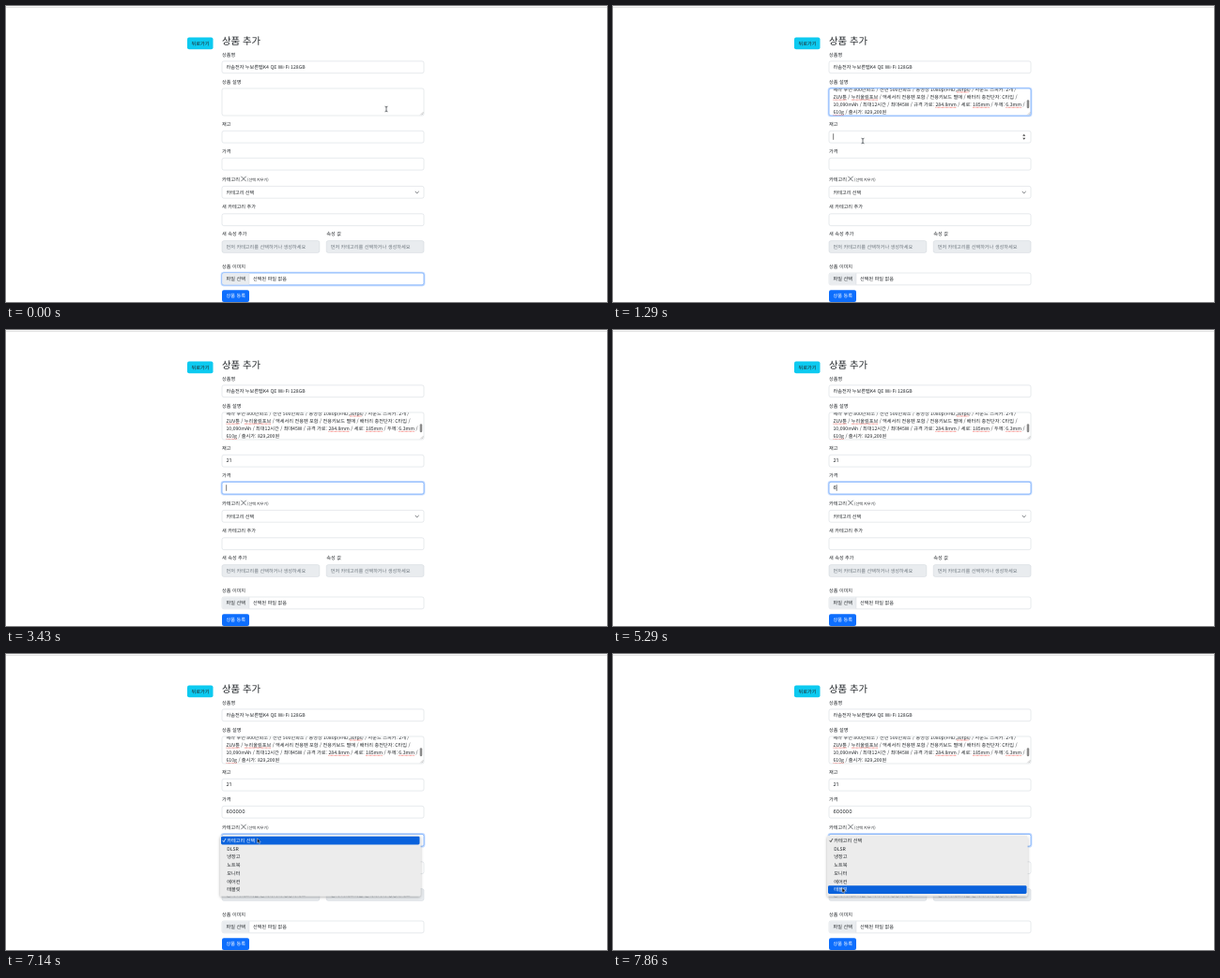
An HTML page for the animation above (8 s loop, 640x316 px).

```html
<!DOCTYPE html>
<html lang="ko">
<head>
<meta charset="utf-8">
<style>
  html, body { margin: 0; width: 100%; height: 100%; overflow: hidden; background: #fff; }
  svg { display: block; width: 100%; height: 100%; }
  text {
    font: 400 5.15px "Noto Sans CJK KR", "Noto Sans CJK", "Noto Sans", sans-serif;
    fill: #212529; text-rendering: geometricPrecision; white-space: pre;
  }
  .label { font-weight: 500; }
  .title { font-size: 10.4px; font-weight: 500; }
  .small { font-size: 4.1px; }
  .muted { fill: #6c757d; }
  .white { fill: #fff; font-weight: 500; }
  .number { font: 400 5.3px Inter, "Noto Sans", sans-serif; }
  .box { stroke: #ced4da; stroke-width: .5; }
  .ring { fill: none; stroke: #0d6efd; stroke-opacity: .25; stroke-width: 1.5; visibility: hidden; }
  .focus .ring { visibility: visible; }
  .focus .box { stroke: #77adfb; stroke-width: .8; }
  .line { fill: none; stroke: #343a40; stroke-width: .7; stroke-linecap: round; stroke-linejoin: round; }
  .typo { stroke: #f0443c; stroke-width: .7; stroke-dasharray: .8 .5; }
</style>
</head>
<body>
<svg id="stage" viewBox="0 0 640 316">
  <defs>
    <clipPath id="areaClip"><rect x="230.3" y="88.3" width="214.4" height="28.4"/></clipPath>
    <filter id="shadow" x="-10%" y="-20%" width="120%" height="150%">
      <feDropShadow dx="0" dy="1.2" stdDeviation="1.8" flood-opacity=".32"/>
    </filter>
  </defs>
</svg>
<script>
const stage = document.getElementById("stage");
const TICK = 1000 / 7, LOOP = 8000;

function add(tag, attrs = {}, parent = stage, content = "") {
  const el = document.createElementNS("http://www.w3.org/2000/svg", tag);
  for (const key in attrs) el.setAttribute(key, attrs[key]);
  el.textContent = content;
  return parent.appendChild(el);
}
// y is the optical middle of the line
function write(content, x, y, cls = "", parent = stage) {
  const drop = cls === "title" ? 4 : cls === "small" ? 1.6 : 2;
  return add("text", { x, y: y + drop, class: cls }, parent, content);
}
function field(y, height = 12.8, x = 230, width = 215, fill = "#fff") {
  const g = add("g");
  add("rect", { class: "ring", x: x - .6, y: y - .6, width: width + 1.2, height: height + 1.2, rx: 2.4 }, g);
  add("rect", { class: "box", x, y, width, height, rx: 2, fill }, g);
  return g;
}
function button(content, x, y, width, fill, cls) {
  add("rect", { x, y, width, height: 12.8, rx: 2, fill });
  write(content, x + 4.5, y + 6.2, cls);
}
function show(el, on) { el.style.visibility = on ? "visible" : "hidden"; }

// Page
add("rect", { y: .8, width: 640, height: 1, fill: "#dcdcdc" });
button("뒤로가기", 193, 33.4, 27.5, "#0dcaf0", "label");
write("상품 추가", 230, 37, "title");
[["상품명", 51.5], ["상품 설명", 80.5], ["재고", 126], ["가격", 155], ["카테고리", 185],
 ["새 카테고리 추가", 214.2], ["새 속성 추가", 243.4], ["상품 이미지", 277.5]]
  .forEach(([name, y]) => write(name, 230, y, "label"));
write("속성 값", 341.3, 243.4, "label");
add("path", { class: "line", d: "M250.6 182.1l4.8 4.8m0-4.8l-4.8 4.8", "stroke-width": .5 });
write("(선택 지우기)", 257, 185.2, "small");

field(58.9);
write("라솜전자 누보른탭K4 QE Wi-Fi 128GB", 234.5, 65);
const area = field(88, 29);
const stock = field(133.3);
const price = field(162.3);
const select = field(192.4);
write("카테고리 선택", 234.5, 198.5);
add("path", { class: "line", d: "M436 198.2l1.7 1.7 1.7-1.7" });
field(221.8);
for (const x of [230, 341.2]) {
  field(250.6, 12.8, x, 103.8, "#e9ecef");
  write("먼저 카테고리를 선택하거나 생성하세요", x + 4.5, 256.6, "muted");
}
const file = field(285);
add("path", { d: "M259 285.3h-27a1.7 1.7 0 0 0-1.7 1.7v8.8a1.7 1.7 0 0 0 1.7 1.7h27z", fill: "#e9ecef" });
add("path", { d: "M259 285.3v12.2", stroke: "#ced4da", "stroke-width": .4 });
write("파일 선택", 234.5, 291);
write("선택된 파일 없음", 263, 291);
button("상품 등록", 230, 303.2, 29, "#0d6efd", "white");

// Description
const pasted = add("g", { "clip-path": "url(#areaClip)" });
const typos = add("g", { "clip-path": "url(#areaClip)" });
const spec = [
  ["메라 후면 800만화소 / 전면 500만화소 / 동영상 1080p(FHD,30fps) / 사운드 스피커: 2개 /", "30fps"],
  ["ZUV튠 / 누리울림포브 / 액세서리 전용펜 포함 / 전용키보드 별매 / 배터리 충전단자: C타입 /", "ZUV튠", "누리울림포브"],
  ["10,090mAh / 최대12시간 / 최대45W / 규격 가로: 284.8mm / 세로: 185mm / 두께: 6.3mm /", "284.8mm", "185mm", "6.3mm"],
  ["610g / 출시가: 829,200원", "610g"]
].map(([content, ...words], i) => {
  const y = 88.7 + i * 8.15, line = write(content, 234.5, y, "", pasted);
  for (const word of words) {
    const at = content.indexOf(word);
    const x1 = line.getStartPositionOfChar(at).x;
    const x2 = line.getEndPositionOfChar(at + word.length - 1).x;
    add("line", { class: "typo", x1, x2, y1: y + 3.3, y2: y + 3.3 }, typos);
  }
  return line;
});
add("rect", { x: 440.7, y: 100.2, width: 2.5, height: 9, rx: 1.2, fill: "#8b8b8b" }, pasted);
add("path", { class: "line", d: "M441.6 116l2.6-2.6m-1.2 2.6l1.2-1.2", style: "stroke:#888;stroke-width:.4" });

// Values and caret
const stockText = write("", 234.5, 139.4, "number");
const priceText = write("", 234.5, 168.4, "number");
const spinner = add("path", { d: "M436.2 138.8l1.5-2 1.5 2zM436.2 140.8l1.5 2 1.5-2z", fill: "#444" });
const caret = add("rect", { width: .6, height: 6.6, fill: "#222" });

// Drop-down list
const ROW = 8.75, LIST_TOP = 194.7;
const list = add("g");
add("rect", { x: 228, y: 193.8, width: 213.5, height: 64.8, rx: 2.2, fill: "#ececec", filter: "url(#shadow)" }, list);
const bar = add("rect", { x: 229, width: 211.5, height: 8.7, rx: 1.4, fill: "#0a62dc" }, list);
const items = ["카테고리 선택", "DLSR", "냉장고", "노트북", "모니터", "에어컨", "태블릿"]
  .map((name, i) => write(name, 235.3, LIST_TOP + 4.2 + i * ROW, "", list));
const check = add("path", { class: "line", d: "M230.8 199.2l1.1 1.5 1.9-3.4" }, list);

// Pointers, drawn around their hot spot
const beam = add("path", { class: "line", d: "M-1.1-2.8Q0-2.8 0-2V2Q0 2.8-1.1 2.8M1.1-2.8Q0-2.8 0-2M0 2Q0 2.8 1.1 2.8" });
const arrow = add("path", { d: "M0 0V5.2L1.2 4.1 2 6 2.9 5.6 2.1 3.8H3.7Z", fill: "#111", stroke: "#fff", "stroke-width": .4 });

// [tick, x, y]
const path = [[0, 405, 110], [4, 405, 110], [9, 266, 144], [44, 266, 144], [45, 256, 168],
  [49, 268, 195.5], [51, 267, 198], [52, 262, 206], [53, 255, 224], [54, 247, 242], [55, 244, 249.5]];
function pointerAt(tick) {
  const next = path.findIndex(p => p[0] >= tick);
  if (next < 1) return path[0].slice(1);
  const a = path[next - 1], b = path[next], k = (tick - a[0]) / (b[0] - a[0]);
  return [a[1] + (b[1] - a[1]) * k, a[2] + (b[2] - a[2]) * k];
}
// Latest value whose tick has passed
const latest = (tick, steps) => steps.reduce((v, [at, value]) => tick >= at ? value : v, steps[0][1]);

function render(ms) {
  const tick = Math.min(55, Math.floor((ms % LOOP + 6) / TICK));

  const focused = latest(tick, [[0, file], [2, area], [10, stock], [24, price], [50, select]]);
  for (const f of [file, area, stock, price, select]) f.setAttribute("class", f === focused ? "focus" : "");

  const hasText = tick >= 4;
  show(pasted, hasText);
  show(typos, tick >= 6);
  stockText.textContent = latest(tick, [[0, ""], [18, "2"], [19, "21"]]);
  priceText.textContent = latest(tick, [[0, ""], [37, "6"], [38, "60"], [40, "600"], [41, "6000"], [42, "600000"]]);
  show(spinner, tick >= 9 && tick < 24);

  const owner = latest(tick, [[0, null], [1, area], [9, stock], [23, price], [50, null]]);
  const lit = latest(tick, [[0, true], [13, false], [16, true], [27, false], [31, true],
    [34, false], [37, true], [46, false], [49, true]]);
  show(caret, owner && lit);
  const line = owner === stock ? stockText : owner === price ? priceText : hasText ? spec[3] : null;
  caret.setAttribute("x", 234.5 + (line ? line.getComputedTextLength() : 0));
  caret.setAttribute("y", owner === stock ? 136.2 : owner === price ? 165.2 : hasText ? 109.8 : 91);

  const [x, y] = pointerAt(tick);
  const open = tick >= 50, row = Math.floor((y - LIST_TOP) / ROW);
  list.style.display = open ? "" : "none";
  bar.setAttribute("y", LIST_TOP + row * ROW);
  items.forEach((item, i) => item.setAttribute("class", i === row ? "white" : ""));
  check.style.stroke = row === 0 ? "#fff" : "#222";

  const visible = tick < 18 || tick >= 45, overText = y < 176;
  show(beam, visible && overText);
  show(arrow, visible && !overText);
  for (const p of [beam, arrow]) p.setAttribute("transform", `translate(${x} ${y})`);
}

const start = performance.now();
function frame() {
  render(performance.now() - start);
  requestAnimationFrame(frame);
}
frame();
</script>
</body>
</html>
```
